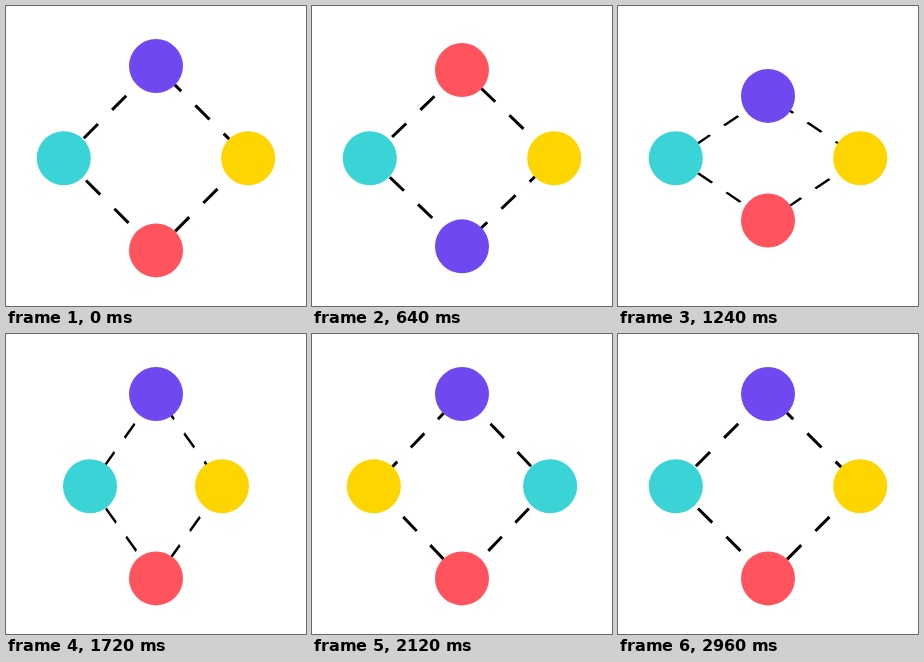
An HTML page for the animation above (3 s loop, 300x300 px).

```html
<!DOCTYPE html>
<html lang="en">
<head>
<meta charset="utf-8">
<title>Swapping dots</title>
<style>
  html, body { margin: 0; height: 100%; overflow: hidden; background: #fff; }
  svg { display: block; width: 300px; height: 300px; }
</style>
</head>
<body>
<svg viewBox="0 0 300 300">
  <g transform="translate(150 152.2)">
    <g id="diamond" stroke="#000" stroke-width="3" stroke-dasharray="20">
      <path d="M0-92.2 92.2 0" stroke-dashoffset="-15.7"/>
      <path d="M92.2 0 0 92.2" stroke-dashoffset="-3.4"/>
      <path d="M0 92.2-92.2 0" stroke-dashoffset="-38.9"/>
      <path d="M-92.2 0 0-92.2" stroke-dashoffset="-28.3"/>
    </g>
    <circle id="top" r="27" fill="#7048f0"/>
    <circle id="right" r="27" fill="#ffd500"/>
    <circle id="bottom" r="27" fill="#ff535d"/>
    <circle id="left" r="27" fill="#3ad3d6"/>
  </g>
</svg>
<script>
const LOOP = 3000, RADIUS = 92.2, LEG = 740, DELAY = 7, PULL = 0.61;
const get = id => document.getElementById(id);
const diamond = get('diamond');
const [top_, right, bottom, left] = ['top', 'right', 'bottom', 'left'].map(get);

// cubic-bezier(PULL, 0, 1 - PULL, 1), solved by bisection
function ease(x) {
  if (x <= 0) return 0;
  if (x >= 1) return 1;
  let lo = 0, hi = 1, s;
  for (let i = 0; i < 24; i++) {
    s = (lo + hi) / 2;
    const r = 1 - s;
    const bx = 3 * PULL * s * r * r + 3 * (1 - PULL) * s * s * r + s ** 3;
    if (bx < x) lo = s; else hi = s;
  }
  return s * s * (3 - 2 * s);
}

// 1 -> -1 -> 1 over two legs
function flip(time) {
  const leg = time / LEG;
  return 1 - 2 * (ease(leg) - ease(leg - 1));
}

function draw(now) {
  const time = now % LOOP - DELAY;
  const sy = flip(time), sx = flip(time - 2 * LEG);
  diamond.setAttribute('transform', `scale(${sx} ${sy})`);
  top_.setAttribute('cy', -RADIUS * sy);
  bottom.setAttribute('cy', RADIUS * sy);
  left.setAttribute('cx', -RADIUS * sx);
  right.setAttribute('cx', RADIUS * sx);
}

const start = performance.now();
function tick() {
  draw(performance.now() - start);
  requestAnimationFrame(tick);
}
tick();
</script>
</body>
</html>
```
